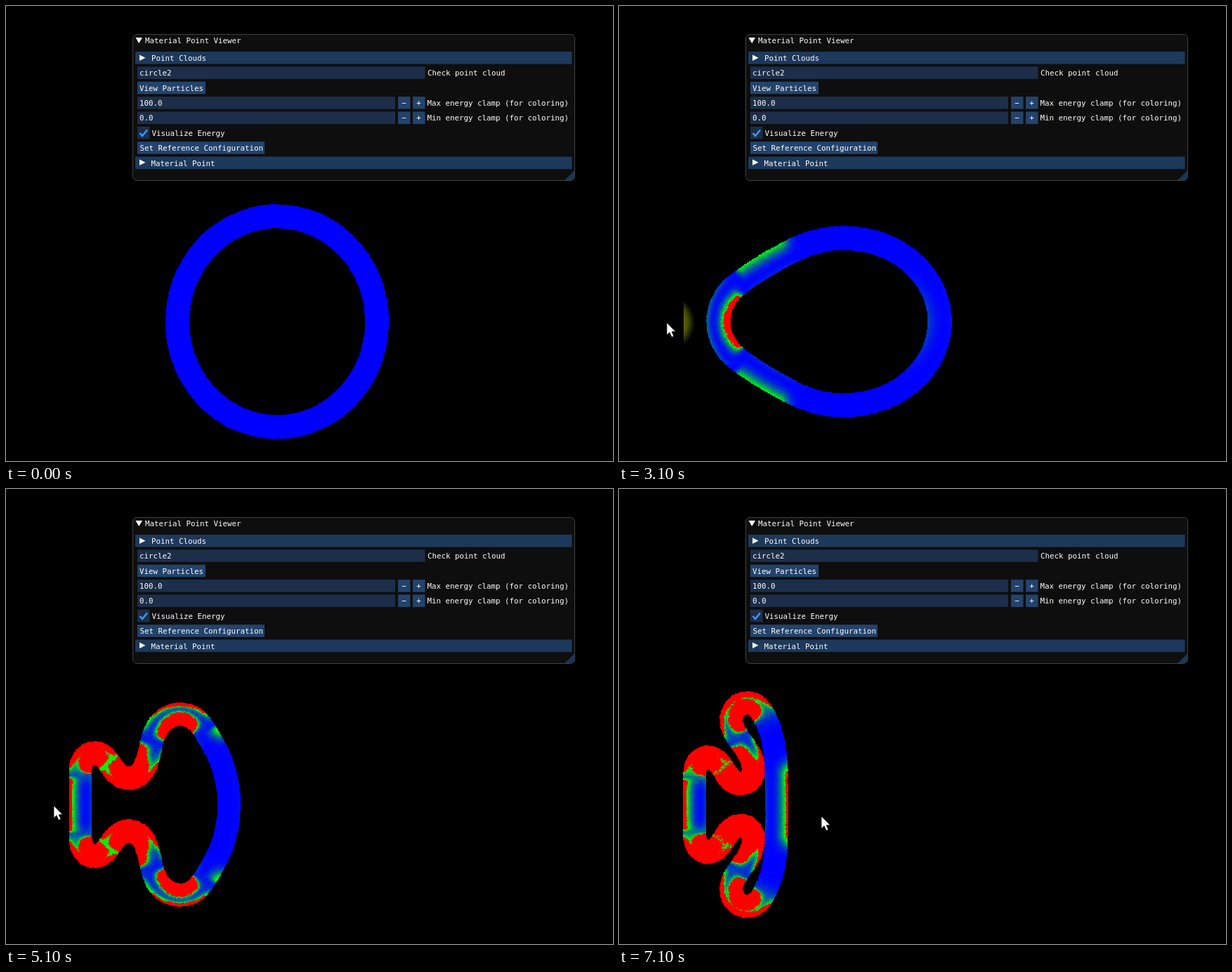
An HTML page with a canvas that plays this animation: 864 px wide and 648 px high, repeating every 7200 ms.

```html
<!DOCTYPE html>
<html lang="en">
<head>
<meta charset="utf-8">
<title>Material Point Viewer</title>
<style>
  html, body { margin: 0; width: 100%; height: 100%; overflow: hidden; background: #000; }
  canvas, svg { position: absolute; left: 0; top: 0; }
  text { font: 10.8px "DejaVu Sans Mono", "Liberation Mono", monospace; fill: #fff; }
</style>
</head>
<body>
<canvas id="stage" width="864" height="648"></canvas>
<svg id="ui" width="864" height="648" viewBox="0 0 864 648">
  <rect x="180.5" y="40.5" width="629" height="208" rx="6" fill="#0e0e0e" stroke="#414145"/>
  <path d="M795 248L809.5 234V243Q809.5 248 804 248Z" fill="#1b3554"/>
  <g id="widgets"></g>
  <path d="M184.5 45H194L189.2 53Z" fill="#fff"/>
  <path d="M190 69.5L198.5 73.8L190 78Z M190 218.5L198.5 222.8L190 227Z" fill="#fff"/>
  <path d="M190.5 181L194 185L201 176.5" fill="none" stroke="#4296fa" stroke-width="2.5"/>
  <path id="cursor" d="M0 0V17.5L4 13.8L7 20.5L10 19.3L7.2 12.8H12.5Z" fill="#fff" stroke="#000" stroke-width=".7"/>
</svg>
<script>
const LOOP = 7200, STEP = 100, AXIS = 449, WALL = 91, SAMPLES = 320, LANES = 17;
const ctx = document.getElementById('stage').getContext('2d');
const cursor = document.getElementById('cursor');

function buildPanel() {
  const HEADER = '#1d395b', FIELD = '#1c2e49', BUTTON = '#23436b';
  const rowTop = row => 65 + 21.36 * row;
  const box = (row, x, w, fill) =>
    `<rect x="${x}" y="${rowTop(row)}" width="${w}" height="17.6" fill="${fill}"/>`;
  const label = (row, x, s) => `<text x="${x}" y="${rowTop(row) + 13}">${s}</text>`;
  const numberRow = (row, value, name) =>
    box(row, 187, 367, FIELD) + box(row, 558, 17.5, BUTTON) + box(row, 579, 17.5, BUTTON)
    + label(row, 190, value) + label(row, 563.3, '−') + label(row, 584.3, '+')
    + label(row, 599.5, name + ' energy clamp (for coloring)');
  document.getElementById('widgets').innerHTML =
    '<text x="198" y="53">Material Point Viewer</text>'
    + box(0, 184, 621.5, HEADER) + label(0, 207, 'Point Clouds')
    + box(1, 187, 409.5, FIELD) + label(1, 190, 'circle2') + label(1, 600, 'Check point cloud')
    + box(2, 187, 97, BUTTON) + label(2, 190, 'View Particles')
    + numberRow(3, '100.0', 'Max') + numberRow(4, '0.0', 'Min')
    + box(5, 187, 17.5, FIELD) + label(5, 207.5, 'Visualize Energy')
    + box(6, 187, 181, BUTTON) + label(6, 190.5, 'Set Reference Configuration')
    + box(7, 184, 621.5, HEADER) + label(7, 206.5, 'Material Point');
}

const mix = (a, b, k) => a + (b - a) * k;

// Linear lookup in rows whose first item is the key.
function lookup(rows, key) {
  let i = 1;
  while (i < rows.length - 1 && rows[i][0] < key) i++;
  const a = rows[i - 1], b = rows[i];
  const k = Math.min(1, Math.max(0, (key - a[0]) / (b[0] - a[0])));
  return a.slice(1).map((v, j) => mix(v, b[j + 1], k));
}

// Headings along the upper half of the band, 0 = up and 180 = down,
// turning evenly between the given [position, degrees] bends.
function headings(bends) {
  const rows = [[0, 0], ...bends, [1, 180]];
  const at = s => s < 0 ? -lookup(rows, -s)[0] : s > 1 ? 360 - lookup(rows, 2 - s)[0] : lookup(rows, s)[0];
  return Array.from({ length: SAMPLES }, (_, i) => {
    let sum = 0;
    for (let k = -4; k <= 4; k++) sum += at(i / (SAMPLES - 1) + k * .006);
    return sum / 9 * Math.PI / 180;
  });
}

const pose = (at, left, right, rise, bends = []) =>
  ({ at, state: [left, right, rise, ...headings(bends)] });

// Extent of the centre line, then its bends.
const poses = [
  pose(0, 243.5, 527.5, 150),
  pose(1800, 243.5, 527.5, 150),
  pose(2300, 237, 521, 146),
  pose(3100, 141, 456, 119, [[.15, 53], [.36, 63]]),
  pose(3600, 106, 404, 119, [[.1, 0], [.2, 75], [.32, 58], [.45, 70]]),
  pose(4300, 104, 355, 105.5, [[.13, -8], [.3, 155], [.42, 30], [.55, 80]]),
  pose(5100, 105, 317, 129, [[.11, 0], [.235, 145], [.285, 142], [.42, 20], [.5, 12], [.73, 145], [.8, 147]]),
  pose(6400, 105, 209, 135, [[.115, 0], [.225, 168], [.3, 172], [.4, 8], [.52, -38], [.57, -28], [.7, 145], [.88, 180]]),
  pose(7100, 107, 224, 145, [[.11, 0], [.22, 140], [.27, 148], [.41, -20], [.5, -42], [.55, -25], [.72, 146], [.88, 178]])
];

const pointer = [[100, 850, 638], [800, 163, 468], [1100, 126, 455], [1700, 126, 455],
  [1900, 68, 451], [5800, 68, 451], [6400, 168, 455.5], [7100, 288, 466]];

// Monotone cubic interpolation of one state value between poses i and i + 1.
function glide(i, u, n) {
  const slope = j => (poses[j + 1].state[n] - poses[j].state[n]) / (poses[j + 1].at - poses[j].at);
  const d = slope(i);
  const tangent = j => {
    if (j < 0 || j > poses.length - 2) return d;
    const other = slope(j);
    return d * other > 0 ? 2 * d * other / (d + other) : 0;
  };
  const h = poses[i + 1].at - poses[i].at, w = 1 - u;
  return poses[i].state[n] * w * w * (1 + 2 * u) + poses[i + 1].state[n] * u * u * (3 - 2 * u)
    + h * (tangent(i - 1) * u * w * w - tangent(i + 1) * u * u * w);
}

function stateAt(t) {
  let i = 0;
  while (i < poses.length - 2 && poses[i + 1].at <= t) i++;
  const u = Math.min(1, (t - poses[i].at) / (poses[i + 1].at - poses[i].at));
  return poses[i].state.map((_, n) => glide(i, u, n));
}

// Walk along the headings, close the loop on the axis and fit the extent.
function centreLine([left, right, rise, ...angles]) {
  let x = 0, y = 0;
  const walk = angles.map((a, i) => {
    if (i) {
      const mid = (a + angles[i - 1]) / 2;
      x += Math.sin(mid);
      y += Math.cos(mid);
    }
    return [x, y];
  });
  walk.forEach((p, i) => p[1] -= y * i / (SAMPLES - 1));
  const xs = walk.map(p => p[0]);
  const low = Math.min(...xs), high = Math.max(...xs), top = Math.max(...walk.map(p => p[1]));
  return walk.map(p => [mix(left, right, (p[0] - low) / (high - low)), AXIS - rise * p[1] / top]);
}

// Point of the line, mirrored at the axis beyond either end.
function pointAt(line, n) {
  const last = SAMPLES - 1;
  const [x, y] = line[n < 0 ? -n : n > last ? 2 * last - n : n];
  return [x, n < 0 || n > last ? 2 * AXIS - y : y];
}

// Bending strain at the band's edge, relative to the round rest shape.
function strainAt(line, n, half) {
  const [p, q, r] = [n - 4, n, n + 4].map(k => pointAt(line, k));
  const ax = q[0] - p[0], ay = q[1] - p[1], bx = r[0] - q[0], by = r[1] - q[1];
  const turn = Math.atan2(ax * by - ay * bx, ax * bx + ay * by);
  return half * (turn * 2 / (Math.hypot(ax, ay) + Math.hypot(bx, by)) - 1 / 146);
}

const palette = Array.from({ length: 81 }, (_, i) => {
  const e = i / 60, red = Math.min(1, Math.max(0, (e - 1) / .16));
  const green = e < 1 ? e : 1 - red;
  return `rgb(${[red, green, Math.max(0, 1 - e)].map(c => Math.round(255 * c))})`;
});

const noise = n => {
  const v = Math.sin(n * 12.9898) * 43758.5453;
  return v - Math.floor(v) - .5;
};

function drawGlow() {
  const g = ctx.createRadialGradient(68, 451, 22, 68, 451, 40);
  g.addColorStop(0, '#756b00');
  g.addColorStop(.45, '#434c08');
  g.addColorStop(1, '#000');
  ctx.fillStyle = g;
  ctx.fillRect(92, 410, 18, 82);
}

function drawBand(t) {
  const line = centreLine(stateAt(t));
  const half = t < 3600 ? 15.4 : 14.8;
  const strain = line.map((_, n) => strainAt(line, n, half));
  const front = .2 + (t - 3500) * .00064;
  for (let n = 0; n < SAMPLES; n++) {
    const [x, y] = line[n];
    const p = pointAt(line, n - 1), q = pointAt(line, n + 1);
    const size = Math.hypot(q[0] - p[0], q[1] - p[1]) || 1;
    const nx = (q[1] - p[1]) / size, ny = (p[0] - q[0]) / size;
    const near = strain.slice(Math.max(0, n - 20), n + 21);
    const damage = 4 * near.reduce((sum, v) => sum + v * v, 0) / near.length;
    const shock = t > 3400 ? 2.2 * Math.exp(-(((n / SAMPLES - front) / .05) ** 2)) : 0;
    const neutral = .5 * Math.tanh(strain[n] * 40);
    for (let lane = 0; lane < LANES; lane++) {
      const v = 2 * lane / (LANES - 1) - 1;
      const base = 60 * (strain[n] * (v - neutral)) ** 2 + damage + shock;
      for (const side of [1, -1]) {
        const r = noise(n * 37 + lane * 5.3 + side);
        const e = base * (1 + r * .15);
        const off = v * half + r;
        const px = Math.max(WALL, x + nx * off);
        const py = AXIS + side * Math.min(0, y + ny * off - AXIS);
        ctx.fillStyle = palette[Math.min(80, Math.round(e * 60))];
        ctx.fillRect(Math.round(px) - 1, Math.round(py) - 1, 3, 3);
      }
    }
  }
}

function render(t) {
  ctx.fillStyle = '#000';
  ctx.fillRect(0, 0, 864, 648);
  if (t >= 1900 && t < 3500) drawGlow();
  drawBand(t);
  const [x, y] = lookup(pointer, t);
  cursor.setAttribute('transform', `translate(${x} ${y})`);
  cursor.style.display = t < 100 ? 'none' : '';
}

let shown = -1;
function tick() {
  const t = Math.floor(performance.now() % LOOP / STEP) * STEP;
  if (t !== shown) render(shown = t);
  requestAnimationFrame(tick);
}

buildPanel();
tick();
</script>
</body>
</html>
```
